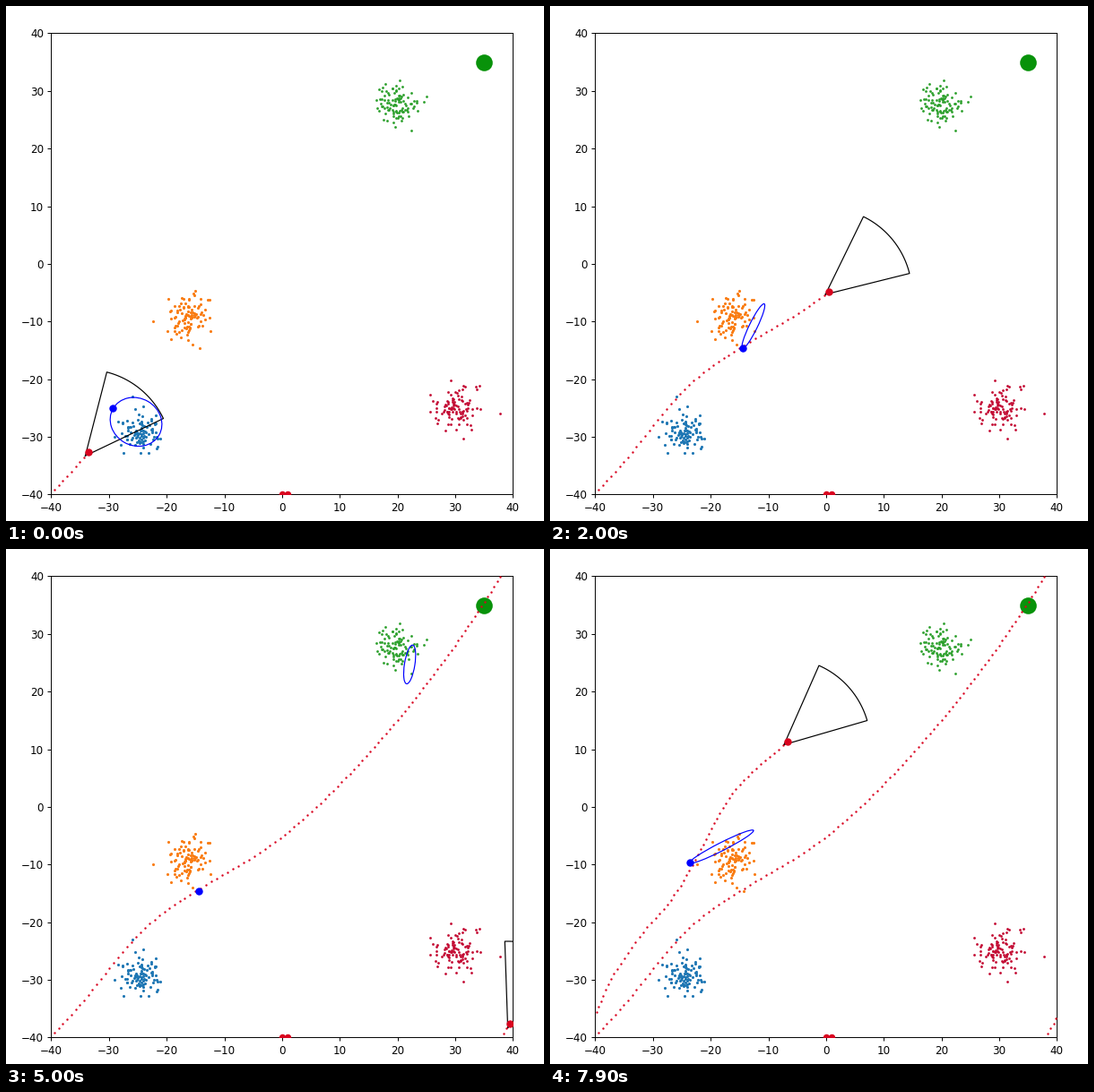
These frames come from a looping animation (600x575 px, 8000 ms). A matplotlib script:

```python
import numpy as np
import matplotlib.pyplot as plt
from matplotlib.animation import FuncAnimation
from matplotlib.patches import Ellipse

W, H, DPI = 600, 575, 100
LEFT, TOP, SIDE = 50.4, 30.4, 515
PT = 72 / DPI             # points per pixel
FRAMES, INTERVAL = 80, 100
RED = "#d9041f"
VIEW_RANGE, HALF_FOV, LAG = 15, 25, 0.78

# Key points of the route: tick, x, y, heading. The arena wraps every 80 units.
ROUTE = np.array([
    (-4.5, -40.2, -40, 48), (0, -33.6, -32.7, 50.6), (6, -24.5, -21.7, 44.4),
    (20, 0.5, -4.8, 39), (32, 18, 12.7, 48.7), (48.6, 37.9, 40.1, 58),
    (50, 39.4, 42.4, 67), (55, 43.8, 51.9, 55), (60, 50.5, 60.8, 45.6),
    (72, 63.2, 81.5, 56), (79, 73.3, 91.3, 41.2)])

# Each sighting: first tick, last tick, whether the near marker follows,
# and the fitted ellipse (x, y, half axes, angle) at both ends.
SIGHTINGS = [
    (0, 5, True, (-25.3, -27.4, 4.6, 4.1, 150), (-24.5, -24.4, 2.3, 1.2, 150)),
    (5, 13, True, (-17.5, -10.7, 5.6, 1.9, -38), (-12.6, -10.8, 4.3, 0.7, -116)),
    (31, 36, False, (21.6, 24.9, 2.2, 1.1, 80), (22.1, 24.7, 3.4, 0.9, 81)),
    (59, 66, True, (-19.4, -10.4, 4.5, 1.5, 143), (-18.1, -6.9, 6.2, 0.7, 207))]


def wrap(p):
    return (p + 40) % 80 - 40


def locate(tick):
    """Cubic Hermite curve through the route's key points."""
    tick = np.asarray(tick, float)
    i = np.clip(np.searchsorted(ROUTE[:, 0], tick, side="right") - 1,
                0, len(ROUTE) - 2)
    (t0, *p0, h0), (t1, *p1, h1) = ROUTE[i].T, ROUTE[i + 1].T
    p0, p1 = np.array(p0), np.array(p1)
    u = (tick - t0) / (t1 - t0)
    chord = np.hypot(*(p1 - p0))
    d0, d1 = (chord * np.array([np.cos(a), np.sin(a)])
              for a in np.radians([h0, h1]))
    return ((2 * u**3 - 3 * u**2 + 1) * p0 + (u**3 - 2 * u**2 + u) * d0
            + (3 * u**2 - 2 * u**3) * p1 + (u**3 - u**2) * d1)


def heading(tick):
    dx, dy = locate(tick + 0.01) - locate(tick - 0.01)
    return np.arctan2(dy, dx)


def pose(sighting, tick):
    start, end, _, first, last = sighting
    u = np.clip((tick - start) / (end - start), 0, 1)
    ease = u * u * (3 - 2 * u)
    return np.array(first) * (1 - ease) + np.array(last) * ease


fig = plt.figure(figsize=(W / DPI, H / DPI), dpi=DPI, facecolor="white")
ax = fig.add_axes([LEFT / W, 1 - (TOP + SIDE) / H, SIDE / W, SIDE / H])
ticks = range(-40, 41, 10)
ax.set(xlim=(-40, 40), ylim=(-40, 40), xticks=ticks, yticks=ticks)
ax.tick_params(labelsize=8.6, length=3, width=0.7, pad=3)
for spine in ax.spines.values():
    spine.set_linewidth(0.7)


def dots(xy, size, color, z):
    x, y = np.atleast_2d(xy).T
    return ax.plot(x, y, "o", ms=size * PT, mew=0, color=color, zorder=z)[0]


# Obstacles: centre, one stray point, colour, dot size
rng = np.random.default_rng(7)
for center, stray, color, size in [
        ((-24.3, -29), (-25.9, -23), "#1f77b4", 3.1),
        ((-16.2, -9), (-14.3, -14.6), "#f97c12", 3.1),
        ((19.8, 28.5), (25.1, 29.1), "#2ca02c", 2.8),
        ((30, -25), (37.7, -26), "#c30a32", 2.8)]:
    cloud = rng.normal(center, 1.9, (99, 2))
    dots(np.vstack([cloud, stray]), size, color, 2)

dots((35, 35), 18.6, "#08920a", 2)
dots([(0, -40), (1, -40)], 7.5, RED, 3)

trail = dots((0, 0), 2.4, RED, 4)
view, = ax.plot([], [], color="black", lw=0.86, zorder=3)
fit = ax.add_patch(Ellipse((0, 0), 1, 1, fill=False, ec="blue", lw=0.86,
                           zorder=5))
near = dots((0, 0), 8.4, "blue", 6)
robot = dots((0, 0), 8.4, RED, 7)


def draw(tick):
    trail.set_data(*wrap(locate(np.arange(-4, tick + 0.1, 0.5))))

    pos = wrap(locate(tick))
    robot.set_data(*pos[:, None])

    head = heading(tick)
    fov = np.radians(HALF_FOV)
    arc = np.linspace(head - fov, head + fov, 40)
    x, y = pos - LAG * np.array([np.cos(head), np.sin(head)])
    view.set_data(np.r_[x, x + VIEW_RANGE * np.cos(arc), x],
                  np.r_[y, y + VIEW_RANGE * np.sin(arc), y])

    seen = [s for s in SIGHTINGS if s[0] <= tick]
    cx, cy, a, b, angle = pose(seen[-1], tick)
    fit.set(center=(cx, cy), width=2 * a, height=2 * b, angle=angle)

    # The near marker sits at the tip of the last followed ellipse.
    cx, cy, a, _, angle = pose([s for s in seen if s[2]][-1], tick)
    tip = np.radians(angle)
    near.set_data([cx + a * np.cos(tip)], [cy + a * np.sin(tip)])
    return trail, view, fit, near, robot


anim = FuncAnimation(fig, draw, frames=FRAMES, interval=INTERVAL,
                     repeat=True, repeat_delay=0)
plt.show()
```
